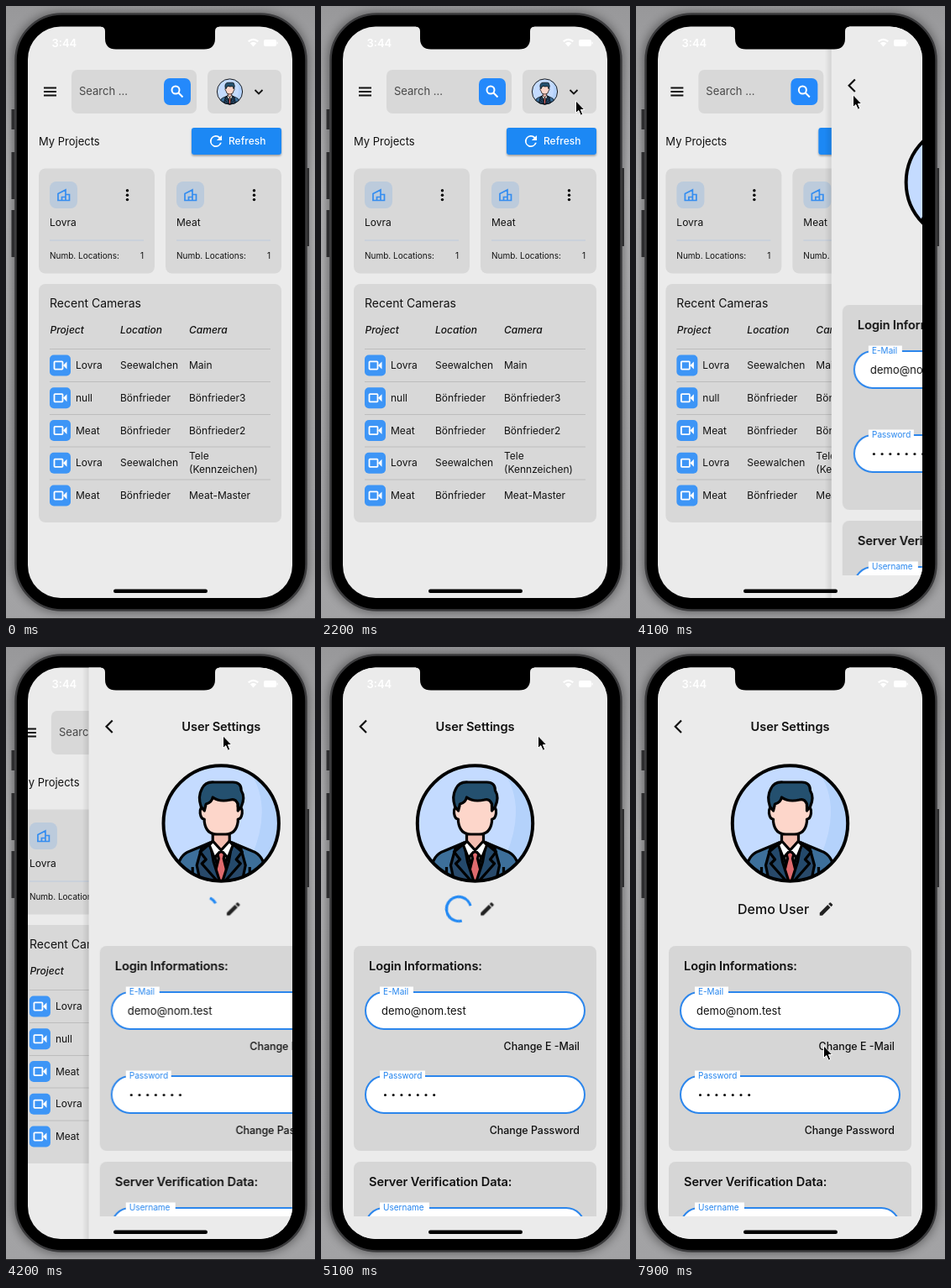
These frames come from a looping animation (368x730 px, 8 s). An HTML page:

```html
<!DOCTYPE html>
<html lang="en">
<head>
<meta charset="utf-8">
<title>Phone app: user settings</title>
<style>
  html, body { margin: 0; width: 100%; height: 100%; overflow: hidden; background: #a4a4a6; }
  svg { display: block; width: 368px; height: 730px; }
  text { font: 12px Inter, "Open Sans", sans-serif; fill: #111; }
  .s10 { font-size: 10px; }
  .s13 { font-size: 13px; }
  .s14 { font-size: 14px; }
  .med { font-weight: 500; }
  .action { font-size: 12.4px; font-weight: 500; }
  .head { font-size: 14.6px; font-weight: 600; letter-spacing: -.1px; }
  .label { font-size: 10px; fill: #2384ee; }
  .end { text-anchor: end; }
  .mid { text-anchor: middle; }
  .line { fill: none; stroke: #111; stroke-width: 1.8; }

  .anim { animation: 8s linear infinite; }
  #cursor { animation-name: cursor; }
  #page { animation-name: page; }
  #dash { animation-name: dash; }
  #menu { animation-name: menu; }
  #sheet { animation-name: sheet; transform-origin: 321px 83px; }
  #items { animation-name: items; }
  #loading { animation-name: loading; }
  #named { animation-name: named; }
  #spin { animation-name: spin; transform-origin: 164px 312px; }

  @keyframes cursor {
    0%, 14.9% { transform: translate(290px, 165px); opacity: 0; }
    15% { transform: translate(290px, 165px); opacity: 1; animation-timing-function: ease-in-out; }
    25% { transform: translate(306px, 123px); }
    27%, 34.5% { transform: translate(303px, 112px); }
    36.5%, 40.2% { transform: translate(303px, 102px); animation-timing-function: ease-in-out; }
    46.5%, 78.2% { transform: translate(258px, 105px); animation-timing-function: ease-in; }
    88.75% { transform: translate(212px, 373px); animation-timing-function: ease-out; }
    91.25%, 94% { transform: translate(195px, 455px); animation-timing-function: ease-in-out; }
    98.75%, 100% { transform: translate(223px, 474px); opacity: 1; }
  }
  @keyframes page {
    0%, 50.43% { transform: translateX(330px); }
    50.44% { transform: translateX(315px); animation-timing-function: cubic-bezier(.35, .91, .33, .97); }
    56.69%, 100% { transform: none; }
  }
  @keyframes dash {
    0%, 50.44% { transform: none; animation-timing-function: ease-in-out; }
    56.69%, 100% { transform: translateX(-105px); }
  }
  @keyframes menu {
    0%, 30.6% { opacity: 0; }
    32%, 48.4% { opacity: 1; }
    50.4%, 100% { opacity: 0; }
  }
  @keyframes sheet {
    0%, 30.6% { transform: scale(.4, .1); animation-timing-function: ease-out; }
    34%, 100% { transform: none; }
  }
  @keyframes items {
    0%, 32% { opacity: 0; }
    34.4%, 100% { opacity: 1; }
  }
  @keyframes loading { 0%, 64.8% { opacity: 1; } 64.81%, 100% { opacity: 0; } }
  @keyframes named { 0%, 64.8% { opacity: 0; } 64.81%, 100% { opacity: 1; } }
  @keyframes spin {
    0%, 51% { transform: rotate(-93deg); }
    60%, 100% { transform: rotate(75deg); }
  }
  #spin circle { animation-name: grow; }
  @keyframes grow {
    0%, 50.8% { stroke-dasharray: 0 360; animation-timing-function: cubic-bezier(.4, 0, .2, 1); }
    59.3%, 100% { stroke-dasharray: 270 360; }
  }
</style>
</head>
<body>
<svg viewBox="0 0 368 730">
  <defs>
    <linearGradient id="wall" x2="0" y2="1">
      <stop offset="0" stop-color="#98989a"/>
      <stop offset=".3" stop-color="#b0b0b2"/>
      <stop offset="1" stop-color="#a2a2a4"/>
    </linearGradient>
    <linearGradient id="edge">
      <stop offset="0" stop-opacity="0"/>
      <stop offset="1" stop-opacity=".1"/>
    </linearGradient>
    <filter id="blur"><feGaussianBlur stdDeviation="6"/></filter>
    <filter id="drop" x="-20%" y="-20%" width="140%" height="150%">
      <feDropShadow dx="0" dy="2" stdDeviation="2.5" flood-opacity=".4"/>
    </filter>
    <filter id="low" x="-10%" y="-20%" width="120%" height="160%">
      <feDropShadow dx="0" dy="1.5" stdDeviation="1" flood-opacity=".35"/>
    </filter>
    <clipPath id="screen"><rect x="26" y="24.5" width="315" height="680.5" rx="39"/></clipPath>
    <clipPath id="body"><rect x="26" y="340" width="315" height="338"/></clipPath>
    <clipPath id="disc"><circle r="69"/></clipPath>

    <g id="avatar">
      <circle r="69" fill="#c4dbff"/>
      <g clip-path="url(#disc)" stroke="#000" stroke-width="3.2" stroke-linejoin="round">
        <path d="M34-62Q62-20 36 40L80 70V-60Z" fill="#b4d2fb" stroke="none"/>
        <path d="M-52 74V56Q-51 38-37 33L-13 23H13L37 33Q51 38 52 56V74Z" fill="#3d6f9a"/>
        <path d="M-13 23L-23 28-29 50-24 74H24L29 50 23 28 13 23Z" fill="#28496a"/>
        <path d="M-12 23L0 66 12 23Z" fill="#fff"/>
        <path d="M-5 34H5L3 42 8 62 0 72-8 62-3 42Z" fill="#df6b6e"/>
        <path d="M-13 24L-25 34-18 43-23 48 0 74-9 46ZM13 24L25 34 18 43 23 48 0 74 9 46Z" fill="#24496b"/>
        <path d="M-10 5V22L0 33 10 22V5Z" fill="#f3bdb0"/>
        <path d="M-10 21L0 32-8 41-14 26ZM10 21L0 32 8 41 14 26Z" fill="#fff"/>
        <path d="M-34 52V74M34 52V74" fill="none"/>
        <path d="M-20-20Q-26-19-25-12T-20-5V-2Q-18 13-5 13H5Q18 13 20-2V-5Q24-5 25-12T20-20V-32H-20Z" fill="#fdd6ca"/>
        <path d="M-20-15L-24-20Q-28-32-23-41-19-50-8-49H14Q24-49 24-39 29-31 24-20L20-15V-23Q17-30 11-28-2-25-10-31-11-25-18-23Z" fill="#24506f"/>
      </g>
      <circle r="68.700" fill="none" stroke="#000" stroke-width="4"/>
    </g>
    <path id="pencil" transform="scale(.86) translate(-12 -12)" fill="#222" d="M3 17.25V21h3.75L17.81 9.94l-3.75-3.75zM20.71 7.04a1 1 0 0 0 0-1.41l-2.34-2.34a1 1 0 0 0-1.41 0l-1.83 1.83 3.75 3.75z"/>
    <g id="camera">
      <rect x="-12.5" y="-12.5" width="25" height="25" rx="5" fill="#3d95f6"/>
      <rect x="-7" y="-4.6" width="10" height="9.2" rx=".8" fill="none" stroke="#fff" stroke-width="1.8"/>
      <path d="M3.5 0L8-4.5V4.5Z" fill="#fff"/>
    </g>
    <g id="site">
      <rect x="-16.5" y="-16" width="33" height="32" rx="8" fill="#bccbdc"/>
      <path d="M-6.500 6.500V-1.500L2.500-6V6.500M2.500-.5H7V6.500H-7.400M-2 6.500V2.500H2" fill="none" stroke="#348df0" stroke-width="1.700"/>
    </g>
  </defs>

  <rect width="368" height="730" fill="url(#wall)"/>
  <rect x="8" y="8" width="352" height="714" rx="56" opacity=".4" filter="url(#blur)"/>
  <path d="M0 729.5H368" stroke="#222"/>
  <path d="M8.5 123V147M8.5 174V230M8.5 243V299M359 193V286" stroke="#2c2c2e" stroke-width="4"/>
  <rect x="11.5" y="9.5" width="346" height="710" rx="55" fill="#000" stroke="#3b3b3d" stroke-width="2.5"/>

  <g clip-path="url(#screen)">
    <rect x="26" y="24" width="315" height="681" fill="#ebebeb"/>

    <g id="dash" class="anim">
      <path class="line" d="M45 97.5H60M45 102H60M45 106.5H60"/>
      <g fill="#d8d8d8">
        <rect x="78" y="76" width="149" height="52" rx="7"/>
        <rect x="240" y="76" width="88" height="52" rx="7"/>
        <rect x="39" y="331" width="289" height="284" rx="8"/>
      </g>
      <text class="s13" x="87" y="106" style="fill:#484848">Search ...</text>
      <rect x="188" y="86" width="32" height="32" rx="7" fill="#2489fb"/>
      <g fill="none" stroke="#fff" stroke-width="2">
        <circle cx="202" cy="100" r="4.5"/>
        <path d="M205.3 103.3L210.5 108.5"/>
      </g>
      <use href="#avatar" transform="translate(266.5 102) scale(.22)"/>
      <path class="line" d="M296.5 100L301 104.5 305.5 100"/>
      <text class="s13" x="39" y="165.5">My Projects</text>
      <rect x="221" y="145" width="107" height="32" rx="3" fill="#1f88f4" filter="url(#low)"/>
      <path transform="translate(250 161) scale(.88) translate(-12 -12)" fill="#fff" d="M17.65 6.35A8 8 0 1 0 19.73 14h-2.08A6 6 0 1 1 12 6c1.66 0 3.14.69 4.22 1.78L13 11h7V4z"/>
      <text class="med" x="265" y="165" style="fill:#fff">Refresh</text>
      <g id="cards"></g>
      <text class="s14" x="52" y="359">Recent Cameras</text>
      <g id="heads" font-style="italic"></g>
      <path d="M52 408.5H315M52 447.5H315M52 486.5H315M52 525H315M52 564H315" stroke="#bdbdbd"/>
      <g id="rows"></g>
    </g>

    <g id="menu" class="anim">
      <rect id="sheet" class="anim" x="185" y="83" width="136" height="90" rx="3" fill="#fff" filter="url(#drop)"/>
      <g id="items" class="anim">
        <text class="s13" x="198" y="113">User Settings</text>
        <path class="line" d="M206 141H200V153.5H206M204 147.3H214.5M211 143.5L214.8 147.3 211 151"/>
        <text class="s13" x="224" y="152">Logout</text>
      </g>
    </g>

    <g id="page" class="anim">
      <rect x="18" y="24" width="8" height="681" fill="url(#edge)"/>
      <rect x="26" y="24" width="315" height="681" fill="#ebebeb"/>
      <path class="line" d="M54 87.5L46.8 94.8 54 102" style="stroke-width:2.2"/>
      <text class="head mid" x="183.5" y="100">User Settings</text>
      <use href="#avatar" x="183.5" y="210"/>
      <g id="loading" class="anim">
        <g id="spin" class="anim">
          <circle class="anim" cx="164" cy="312" r="14.5" pathLength="360" fill="none" stroke="#2389f3" stroke-width="3.2"/>
        </g>
        <use href="#pencil" x="198" y="312"/>
      </g>
      <g id="named" class="anim">
        <text class="med" x="121" y="318" style="font-size:16px">Demo User</text>
        <use href="#pencil" x="226.5" y="312"/>
      </g>
      <g clip-path="url(#body)">
        <g fill="#d6d6d6">
          <rect x="39" y="356" width="289" height="244" rx="8"/>
          <rect x="39" y="613" width="289" height="244" rx="8"/>
        </g>
        <text class="head" x="57" y="385">Login Informations:</text>
        <text class="head" x="57" y="641.5">Server Verification Data:</text>
        <g id="fields"></g>
        <text class="s13" x="72" y="437.5">demo@nom.test</text>
        <path d="M76.5 533.5H137" stroke="#111" stroke-width="3.2" stroke-linecap="round" stroke-dasharray="0 9.7"/>
        <text class="action end" x="308" y="480">Change E -Mail</text>
        <text class="action end" x="308" y="580">Change Password</text>
      </g>
    </g>

    <g fill="#fff">
      <text x="54.5" y="48.5" style="font-size:13px;font-weight:600;fill:#fff">3:44</text>
      <path d="M288 41.5Q294.5 36 301 41.5L299.5 43Q294.5 39 289.5 43ZM290.7 44.2Q294.5 41.2 298.3 44.2L294.5 48.5Z"/>
      <rect x="307" y="40" width="15" height="8" rx="2"/>
      <rect x="322.5" y="42.5" width="1.2" height="3" rx=".6"/>
    </g>
    <rect x="128" y="694.5" width="112" height="4.5" rx="2.2"/>
  </g>
  <path d="M113 24V24.5Q118 25 118 30V38.500Q118 51.500 131 51.500H236Q249 51.500 249 38.500V30Q249 25 254 24.500V24Z"/>

  <path id="cursor" class="anim" d="M.5.8V15.5L3.8 12.5 6.3 18.2 8.8 17.2 6.4 11.5H10.8Z" stroke="#fff" stroke-width="1"/>
</svg>
<script>
  const fill = (id, items, draw) => {
    document.getElementById(id).innerHTML = items.map(draw).join('');
  };
  const text = (x, y, str, cls = '') => `<text class="${cls}" x="${x}" y="${y}">${str}</text>`;
  const cols = [83, 136, 218];

  fill('cards', ['Lovra', 'Meat'], (name, i) => `<g transform="translate(${i * 151} 0)">
    <rect x="39" y="193.5" width="138" height="125" rx="8" fill="#d8d8d8"/>
    <use href="#site" x="68.5" y="225"/>
    ${[219.8, 225.2, 230.6].map(y => `<circle cx="144.5" cy="${y}" r="1.7"/>`).join('')}
    ${text(52, 262, name)}
    <path d="M52 279H164" stroke="#bccadd"/>
    ${text(52, 301, 'Numb. Locations:', 's10')}${text(164, 301, '1', 's10 end')}</g>`);

  fill('heads', ['Project', 'Location', 'Camera'], (name, i) =>
    `<text class="med" style="font-style:italic" x="${i ? cols[i] : 52.5}" y="390">${name}</text>`);

  fill('rows', [
    ['Lovra', 'Seewalchen', 'Main'],
    ['null', 'Bönfrieder', 'Bönfrieder3'],
    ['Meat', 'Bönfrieder', 'Bönfrieder2'],
    ['Lovra', 'Seewalchen', 'Tele', '(Kennzeichen)'],
    ['Meat', 'Bönfrieder', 'Meat-Master']
  ], (row, i) => {
    const y = 428 + i * 38.75;
    const cells = row.map((cell, c) => {
      const shift = row.length > 3 && c > 1 ? (c - 2.5) * 16 : 0;
      return text(cols[Math.min(c, 2)], y + 4 + shift, cell);
    });
    return `<use href="#camera" x="64.5" y="${y}"/>` + cells.join('');
  });

  fill('fields', [['E-Mail', 411, 40], ['Password', 511, 54], ['Username', 668, 59]], ([name, y, w]) =>
    `<rect x="53" y="${y}" width="261" height="44" rx="22" fill="#fff" stroke="#2c86ec" stroke-width="2"/>
    <rect x="70" y="${y - 6.5}" width="${w}" height="12" fill="#fff"/>${text(74, y + 3.3, name, 'label')}`);
</script>
</body>
</html>
```
